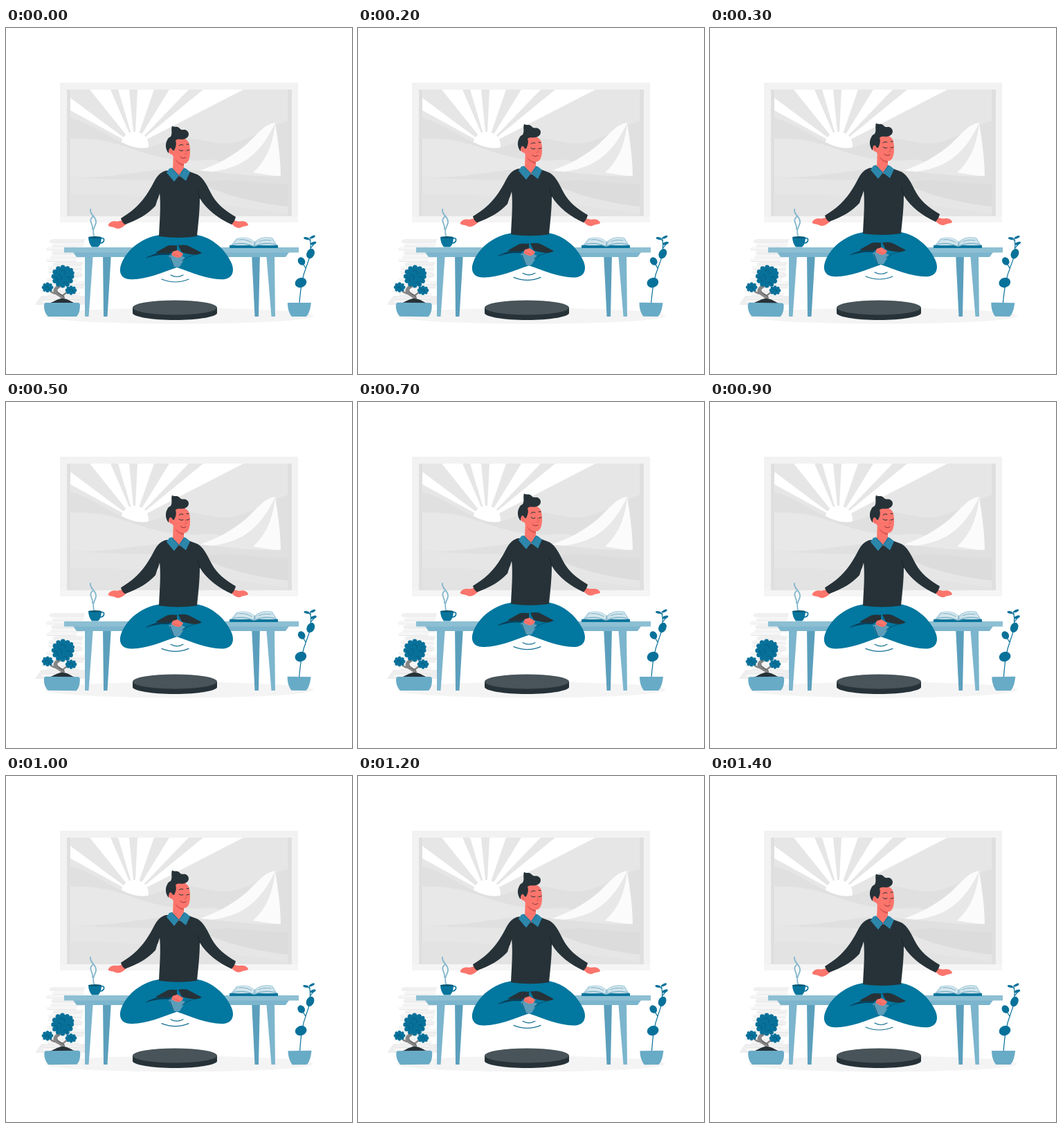
Animation, 500 px wide and 500 px high, one loop 1500 ms. Source, as an HTML page:

```html
<!DOCTYPE html>
<html lang="en">
<head>
<meta charset="utf-8">
<title>Levitating meditation</title>
<style>
html, body { margin: 0; width: 100%; height: 100%; overflow: hidden; background: #fff; }
svg { display: block; width: 100%; height: 100%; }
.line { fill: none; stroke-linecap: round; stroke-linejoin: round; }
</style>
</head>
<body>
<svg viewBox="0 0 500 500">
  <defs><clipPath id="pane"><path d="M93 89H407V272H93Z"/></clipPath></defs>

  <ellipse cx="250" cy="416" rx="194" ry="11.5" fill="#f4f4f4"/>

  <g id="window">
    <path fill="#f2f2f2" d="M78 79H422V281H78Z"/>
    <path fill="#dfdfdf" d="M88 89H413V272H88Z"/>
    <g clip-path="url(#pane)">
      <path fill="#e6e6e6" d="M88 89H413V272H88Z"/>
      <g id="rays" fill="#fff"></g>
      <circle cx="186" cy="170" r="20" fill="#fff"/>
      <path fill="#e0e0e0" d="M93 130C118 136 140 152 162 163C176 169 190 177 208 172C228 166 248 157 268 160C290 162 306 170 328 166C356 160 382 142 407 134V272H93Z"/>
      <path fill="#e8e8e8" d="M93 160C130 158 160 166 186 176C226 190 258 194 300 190L345 205L300 226H93Z"/>
      <path fill="#e8e8e8" d="M271 209C304 199 330 184 349 167C363 154 373 139 389 137C391 158 394 190 397 215C360 216 312 217 271 209Z"/>
      <path fill="#fbfbfb" d="M271 209C304 199 330 184 349 167C363 154 373 139 389 137C376 166 358 187 334 198C315 206 292 210 271 209ZM389 138C386 165 378 190 357 209L397 215C397 190 393 162 389 138Z"/>
      <path fill="#e0e0e0" d="M93 215C140 219 190 207 232 204C292 203 350 218 407 213V272H93Z"/>
      <path fill="#e6e6e6" d="M93 214C150 222 218 217 276 224C322 230 366 244 407 256V272H93Z"/>
      <path fill="#dcdcdc" d="M407 225C365 227 325 214 282 224C306 239 360 253 407 258Z"/>
      <path fill="#e3e3e3" d="M93 240C160 238 250 246 407 268V272H93Z"/>
    </g>
    <path fill="#f5f5f5" d="M78 272H422V281H78Z"/>
  </g>

  <g id="papers"><path fill="#eee" d="M42 400L51 387H115V400Z"/></g>

  <g id="table">
    <path fill="#5b9fbd" d="M140 325H152L146.500 417H141ZM355 325H367L365 417H359.500Z"/>
    <path fill="#7cb5cd" d="M114 325H126L119.500 417H114ZM376 325H388L389 417H383.500Z"/>
    <path fill="#7cb5cd" d="M97 324H409L404 331H102Z"/>
    <path fill="#8dbfd3" d="M84 317H423V324.500H84Z"/>
  </g>

  <g id="cup">
    <g class="line" stroke="#86b8ce" stroke-width="1.900">
      <path d="M122 262C121 271 131 272 130 281C129 288 124 290 127 300"/>
      <path d="M125 273C118 279 127 284 125 291"/>
    </g>
    <path class="line" stroke="#08759d" stroke-width="1.600" d="M137 304C144 302 143 311 135 311"/>
    <path fill="#08759d" d="M119 302H138C138 309 136 314 133 316.500H124C121 313 119 308 119 302Z"/>
    <ellipse cx="128.500" cy="302.500" rx="9.500" ry="1.500" fill="#075773"/>
  </g>

  <g id="book">
    <path fill="#08759d" d="M323 314H393V318H323Z"/>
    <path fill="#b1d2df" d="M325 314L333 304C343 301 353 302 359 309C367 302 376 301 385 303L392 314C380 312 368 312 359 316C348 312 336 312 325 314Z"/>
    <path fill="#d5e7ee" d="M330 311L337 304C346 302 354 305 359 310L357 314C348 310 339 309 330 311ZM361 313L363 308C370 303 377 303 383 304L388 311C377 309 369 309 361 313Z"/>
    <path class="line" stroke="#4f93af" stroke-width=".7" d="M325 314C337 311 349 311 358 316C369 311 382 311 392 314M359 309V315M365 309C371 306 377 306 383 307M337 306C344 305 350 307 355 310"/>
  </g>

  <g id="bonsai">
    <path class="line" stroke="#858585" stroke-width="5" d="M80 393C88 385 66 386 72 377C75 373 79 374 81 366"/>
    <path class="line" stroke="#858585" stroke-width="2.500" d="M74 384C66 384 64 380 62 377M78 388C86 386 86 382 92 379"/>
    <path class="line" stroke="#5d5d5d" stroke-width="1" d="M84 391C87 386 73 386 74 379"/>
    <g id="crown" fill="#08719a"></g>
    <path class="line" stroke="#065878" stroke-width=".8" d="M70 361C74 359 76 363 74 366M79 351C84 349 87 352 85 356M88 360C93 358 95 362 93 366M76 357C81 357 82 361 79 364M83 368C87 366 90 369 88 372M57 375C60 373 63 375 62 378M91 378C94 376 97 378 96 381"/>
    <path fill="#263238" d="M62 398C69 396 74 391 82 391C90 391 94 396 101 398Z"/>
    <path fill="#68abc6" d="M58 397H104Q107 397 107 401C107 409 105 414 102 417H61C58 414 55 409 55 401Q55 397 58 397Z"/>
  </g>

  <g id="plant">
    <path class="line" stroke="#08719a" stroke-width="1.200" d="M424 398C426 374 428 360 434 345C439 333 442 318 439 303M433 347L428 339M441 317L445 312M440 307L434 304"/>
    <g id="leaves" fill="#08719a"></g>
    <path fill="#68abc6" d="M407 397H441C440 406 438 413 434 417H413C409 412 407 405 407 397Z"/>
  </g>

  <g id="cushion">
    <path fill="#263238" d="M183 404V412C183 417 210 422 244 422S305 417 305 412V404Z"/>
    <ellipse cx="244" cy="404" rx="61" ry="10.500" fill="#485459"/>
  </g>

  <g id="man">
    <g class="line" stroke="#146f93" stroke-width="1.200">
      <path d="M238 357Q247 362 256 357"/>
      <path d="M225 363Q245 371 264 363"/>
    </g>

    <g fill="#fb756c">
      <path d="M173 276C166 279 160 280 156 279C151 280 147 283 148 286C151 288 155 287 158 289C164 292 170 287 174 283Z"/>
      <path d="M325 276C331 279 337 280 341 279C346 279 350 282 350 285C347 287 343 286 340 288C334 291 329 286 325 282Z"/>
    </g>

    <path fill="#02779f" d="M222 299C196 303 175 320 167 340C162 352 166 362 178 363C198 365 224 354 247 346C270 354 296 365 316 363C328 361 331 350 325 338C316 319 298 303 276 299Z"/>
    <path fill="#5c9dba" d="M235 329L241 344Q246 347 251 345L259 332L249 327Z"/>
    <path class="line" stroke="#075b7c" stroke-width="1.200" d="M203 332C216 328 228 325 240 324M276 327C267 329 260 331 255 336M237 331L242 344"/>
    <path fill="#0b4058" d="M202 332C214 326 228 321 243 322L235 328C225 327 214 329 202 332Z"/>
    <path fill="#263238" d="M217 324L233 315C239 313 243 315 247 314L247 322C239 326 228 325 217 325ZM249 314C256 313 261 313 266 316L283 325C276 329 266 328 254 324Z"/>
    <path fill="#fb756c" d="M241 323L248 321L256 326C255 331 249 333 245 331L239 328Z"/>
    <path class="line" stroke="#d65753" stroke-width=".7" d="M242 327L250 330"/>

    <path fill="#263238" d="M233 206C224 207 219 213 214 222C203 244 190 261 166 275C167 279 169 282 172 284C191 277 205 269 216 257L222 238C224 258 222 278 221 301Q249 305 276 301C278 281 280 265 280 246C290 263 307 275 326 284C329 281 331 277 332 273C315 263 304 253 298 242C291 229 286 217 277 212C273 210 268 209 264 207L249 211Z"/>
    <path class="line" stroke="#141d21" stroke-width=".7" d="M222 238L219 247M280 246L277 235"/>

    <path fill="#fb756c" d="M242 181L257 192V204L251 215L241 204Z"/>
    <path fill="#dc5954" d="M244 190C248 196 253 199 257 199V196Z"/>
    <path fill="#fb756c" d="M245 160C254 157 263 160 265 168C267 179 266 190 262 194C257 199 248 195 243 187L240 183C235 182 232 176 235 173C237 171 240 172 242 175Z"/>
    <path fill="#263238" d="M241 177C238 171 235 173 235 181C230 175 230 167 233 162C234 159 236 158 238 157C241 152 238 147 240 141.500C243 144 247 141 251 145C255 150 258 144 263 150C266 155 262 161 254 161C250 161 247 160 245 163C247 168 245 173 243 177Z"/>
    <g class="line" stroke="#263238" stroke-width="1">
      <path d="M250 176Q253 179 256 177M261 177Q263 178 265 176M250 170Q253 167 256 169M261 168L264 168"/>
      <path d="M252 186Q255 190 260 187" stroke="#8e3339"/>
      <path d="M259 177L261 182L258 183M237 176Q239 177 239 180" stroke="#d65753" stroke-width=".8"/>
    </g>
    <path fill="#2c87ab" d="M236 203L240 202L250 213L243 222L232 209ZM257 202L260 203L266 208L260 221L250 213Z"/>
    <path class="line" stroke="#0b5f80" stroke-width=".7" d="M240 204L250 213L258 204"/>
  </g>
</svg>
<script>
const $ = id => document.getElementById(id);

function add(parent, tag, attrs) {
  const el = document.createElementNS("http://www.w3.org/2000/svg", tag);
  for (const k in attrs) el.setAttribute(k, attrs[k]);
  $(parent).append(el);
}

// Each ray runs from the sun to a span on the pane edge.
[[93, 101, 93, 119], [121, 89, 151, 89], [162, 89, 178, 89],
 [190, 89, 214, 89], [236, 89, 264, 89], [285, 89, 343, 89]]
  .forEach(([a, b, c, d]) => add("rays", "path", { d: `M${a} ${b}L${c} ${d}L186 170Z` }));

// Loose stacks of paper
for (let i = 0; i < 17; i++) {
  const y = 305 + i * 5.5, x = 62 + 5 * Math.sin(i * 2.3) - (i > 12 ? 7 : 0);
  const w = 49 + 4 * Math.cos(i * 1.7);
  add("papers", "path", {
    d: `M${x} ${y + 2}L${x + 6} ${y}H${x + w}L${x + w - 3} ${y + 5}H${x + 2}Z`,
    fill: i % 3 ? "#f6f6f6" : "#f0f0f0"
  });
  add("papers", "path", {
    d: `M${x + 2} ${y + 5}H${x + w - 3}`, class: "line", stroke: "#e4e4e4", "stroke-width": .8
  });
}

// Clumps: a flattened core with a ring of lobes
[[82, 359, 13, 13, 12], [60, 375, 6, 5, 8], [94, 379, 6, 4.5, 8], [88, 354, 8, 7, 9]]
  .forEach(([x, y, rx, ry, n]) => {
    add("crown", "ellipse", { cx: x, cy: y, rx, ry });
    for (let i = 0; i < n; i++) {
      const a = i / n * Math.PI * 2;
      add("crown", "circle", { cx: x + rx * Math.cos(a), cy: y + ry * Math.sin(a), r: rx * .15 + 1.5 });
    }
  });

[[426, 368, 8.5, 7, -20], [427, 337, 5, 6, -35], [440, 326, 5.5, 7.5, 25],
 [444, 311, 4.5, 2, -20], [434, 304, 4, 1.8, 10], [443, 302, 4, 1.7, -25]]
  .forEach(([x, y, rx, ry, a]) =>
    add("leaves", "ellipse", { cx: x, cy: y, rx, ry, transform: `rotate(${a} ${x} ${y})` }));

const LOOP = 1500, STEP = 100;

function draw(ms) {
  const p = (Math.floor(ms % LOOP / STEP) + .5) * STEP / LOOP;
  const lift = 10 * (1 - Math.abs(2 * p - 1));
  const sway = p < .25 ? 4 * p : p < .75 ? 2 - 4 * p : 4 * p - 4;
  $("man").setAttribute("transform", `translate(0 ${.67 - lift})`);
  $("bonsai").setAttribute("transform", `rotate(${sway} 80 381)`);
  $("plant").setAttribute("transform", `rotate(${sway} 427 358)`);
}

function tick(now) {
  draw(now);
  requestAnimationFrame(tick);
}
draw(0);
requestAnimationFrame(tick);
</script>
</body>
</html>
```
